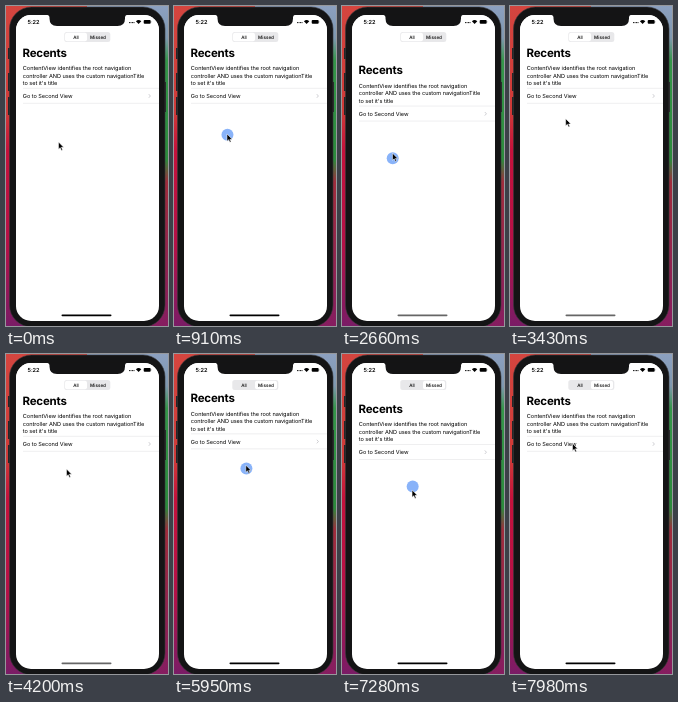
These frames come from a looping animation (162 by 320 pixels, 8 s). An HTML page:

```html
<!DOCTYPE html>
<html lang="en">
<head>
<meta charset="utf-8">
<title>Recents</title>
<style>
  html, body { margin: 0; width: 100%; height: 100%; overflow: hidden; background: #000; }
  svg { display: block; width: 162px; height: 320px; }
  text { font-family: Inter, Roboto, sans-serif; font-size: 5.6px; letter-spacing: -.05px; text-rendering: geometricPrecision; }
  .title { font-size: 11.5px; font-weight: 700; letter-spacing: -.2px; }
  .clock { font-weight: 600; }
  .tab { font-size: 4.6px; font-weight: 500; text-anchor: middle; letter-spacing: 0; }
  .rule { stroke: #dedee0; stroke-width: .5; }
</style>
</head>
<body>
<svg viewBox="0 0 162 320">
  <defs>
    <linearGradient id="left" x2="0" y2="1">
      <stop offset="0" stop-color="#d4453f"/>
      <stop offset=".33" stop-color="#cf3a38"/>
      <stop offset=".45" stop-color="#c5123c"/>
      <stop offset=".75" stop-color="#b41148"/>
      <stop offset="1" stop-color="#7a1c66"/>
    </linearGradient>
    <linearGradient id="right" x2="0" y2="1">
      <stop offset="0" stop-color="#8ca0c0"/>
      <stop offset=".1" stop-color="#7f98b0"/>
      <stop offset=".17" stop-color="#35964a"/>
      <stop offset=".48" stop-color="#2c8a3c"/>
      <stop offset=".55" stop-color="#a02c3c"/>
      <stop offset="1" stop-color="#861d60"/>
    </linearGradient>
    <clipPath id="screen"><rect x="10" y="9" width="143" height="306" rx="15"/></clipPath>
  </defs>

  <rect width="81" height="320" fill="url(#left)"/>
  <rect x="81" width="81" height="320" fill="url(#right)"/>
  <path d="M2 42h3v11h-3zM2 67h3v18h-3zM2 91h3v18h-3zM157 76h3v30h-3z" fill="#252527"/>
  <rect x="3.5" y="1" width="155.5" height="320" rx="22" fill="#141415" stroke="#3a3a3d" stroke-width=".6"/>

  <g clip-path="url(#screen)">
    <rect width="162" height="320" fill="#fff"/>
    <g id="content">
      <text class="title" x="16.5" y="50.6">Recents</text>
      <text x="16.8" y="64">ContentView identifies the root navigation</text>
      <text x="16.8" y="71.5">controller AND uses the custom navigationTitle</text>
      <text x="16.8" y="79">to set it's title</text>
      <text x="16.8" y="92">Go to Second View</text>
      <path class="rule" d="M17 82.3H154M17 97.3H154"/>
      <path d="M142.8 88.2l1.6 1.8-1.6 1.8" fill="none" stroke="#bbbbc0" stroke-width=".7"/>
    </g>
    <rect width="162" height="38.5" fill="#fff"/>
    <path id="barLine" class="rule" d="M0 38.5H162"/>
    <rect x="58.3" y="26" width="46" height="10" rx="2.5" fill="#e8e8ea"/>
    <rect id="thumb" x="59" y="26.7" width="22" height="8.6" rx="2" fill="#fff"/>
    <text class="tab" x="70" y="32.8">All</text>
    <text class="tab" x="92" y="32.8">Missed</text>
    <text class="clock" x="21.5" y="17.8">5:22</text>
    <g id="signal">
      <circle cx="123.5" cy="16.6" r=".55"/><circle cx="125" cy="16.6" r=".55"/>
      <circle cx="126.5" cy="16.6" r=".55"/><circle cx="128" cy="16.6" r=".55"/>
    </g>
    <path d="M132.6 18l-2.7-2.8q2.7-2.2 5.4 0z"/>
    <rect x="137.7" y="13.9" width="7" height="3.8" rx="1"/>
    <path d="M145.1 15.2v1.3" stroke="#777" stroke-width=".5"/>
    <rect id="home" x="55.5" y="308.5" width="50" height="1.7" rx=".85"/>
  </g>
  <path d="M40 8.5H122Q119 9 119 11.5V12.5Q119 20 111.5 20H51Q43.5 20 43.5 12.5V11.5Q43.5 9 40 8.5Z" fill="#141415"/>

  <circle id="touch" r="6" fill="#79a9f8" fill-opacity=".88"/>
  <path id="pointer" d="M0 0V7.2L1.7 5.7L2.9 8.4L4.1 7.9L2.9 5.3H5.2Z" fill="#000" stroke="#fff" stroke-width=".5"/>
</svg>
<script>
const LOOP = 8000, STEP = 70, TOUCH_LAG = 80;

// Each key: time, then values
const pointerKeys = [
  [0, 52.5, 136], [500, 52.5, 136], [900, 53, 128], [1400, 53.5, 91], [2450, 50, 156],
  [3100, 52, 120], [3500, 56, 112], [4200, 60.5, 115], [4850, 91, 31], [5150, 91, 31],
  [5550, 72, 120], [5620, 72, 120], [6500, 71.5, 92], [7390, 70, 138], [7450, 70, 138], [7980, 62.5, 89.5]
];
const scrollKeys = [[0, 0], [980, 0], [1400, 41], [2450, -22], [3200, 0], [5840, 0], [6500, 33], [7390, -10], [7700, 0]];
const thumbKeys = [[0, 0], [5000, 0], [5250, 22]];
const presses = [[850, 3000], [4930, 5080], [5600, 7390]];

const el = id => document.getElementById(id);
const move = (id, x, y) => el(id).setAttribute('transform', `translate(${x} ${y})`);

function sample(keys, t) {
  const next = keys.findIndex(key => key[0] > t);
  if (next < 0) return keys[keys.length - 1].slice(1);
  const a = keys[Math.max(next - 1, 0)], b = keys[next];
  const p = Math.max(0, (t - a[0]) / (b[0] - a[0] || 1));
  const eased = p * p * (3 - 2 * p);
  return a.slice(1).map((v, i) => v + (b[i + 1] - v) * eased);
}

function draw(t) {
  const [scroll] = sample(scrollKeys, t);
  move('content', 0, -scroll);
  el('barLine').style.opacity = scroll > 12 ? 1 : 0;
  move('thumb', sample(thumbKeys, t)[0], 0);
  move('pointer', ...sample(pointerKeys, t));
  const [x, y] = sample(pointerKeys, t - TOUCH_LAG);
  move('touch', x + .5, y);
  el('touch').style.opacity = presses.some(([from, to]) => t >= from && t < to) ? 1 : 0;
  el('home').style.fill = t > 1000 && t < 4700 ? '#666' : '#000';
}

const start = performance.now();
function frame() {
  const t = (performance.now() - start) % LOOP;
  draw(Math.floor(t / STEP) * STEP);
  requestAnimationFrame(frame);
}
frame();
</script>
</body>
</html>
```
